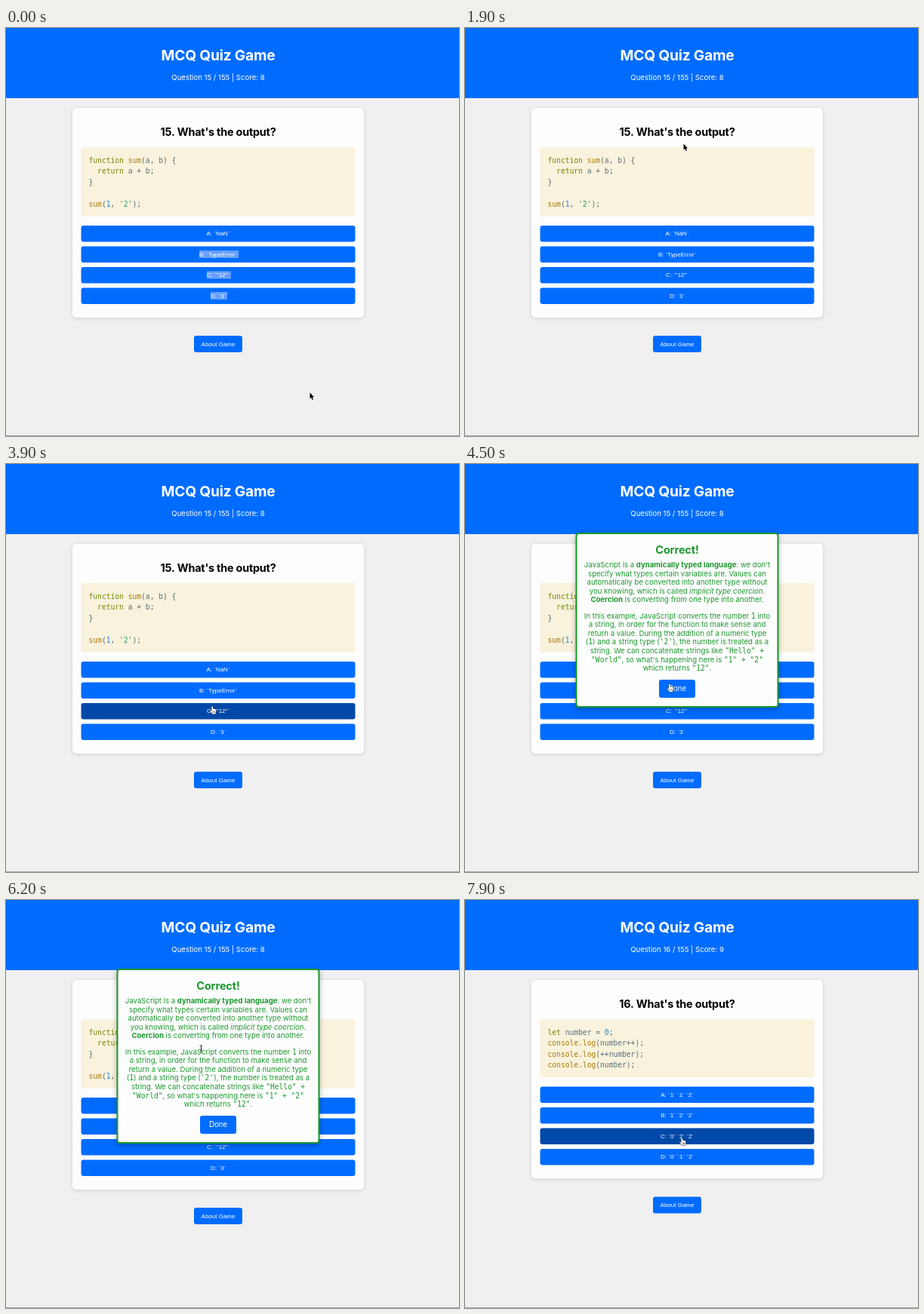
Recreate the animation shown at these times as an HTML page with a canvas. Size 600 by 541 pixels, loop 8 s.

```html
<!DOCTYPE html>
<html lang="en">
<head>
<meta charset="utf-8">
<title>MCQ Quiz Game</title>
<style>
html, body { margin: 0; width: 100%; height: 100%; overflow: hidden; background: #f0f0f0; }
canvas { display: block; width: 600px; height: 541px; }
</style>
</head>
<body>
<canvas id="stage"></canvas>
<script>
const W = 600, H = 541, LOOP = 8000, STEP = 100;
const MID = 281;
const BLUE = '#006cff', DARK = '#0049a8', GREEN = '#1b982d', CARD = '#fdfdfd';
const UI = 'Inter, sans-serif', ARIAL = '"Liberation Sans", Arial, sans-serif';
const MONO = '"DejaVu Sans Mono", monospace';
const DESELECT = 500, POPUP_IN = 4200, POPUP_OUT = 7300;

const canvas = document.getElementById('stage');
const ratio = window.devicePixelRatio || 1;
canvas.width = W * ratio;
canvas.height = H * ratio;
const ctx = canvas.getContext('2d');
ctx.scale(ratio, ratio);

const INK = { k: '#718b08', f: '#ad7b08', n: '#2387d0', s: '#259f6c', p: '#5a6e75' };

// Code lines are lists of "kind:text" tokens.
const first = {
  status: 'Question 15 / 155 | Score: 8',
  title: "15. What's the output?",
  code: [
    ['k:function ', 'f:sum', 'p:(a, b) {'],
    ['k:  return', 'p: a + b;'],
    ['p:}'],
    [],
    ['f:sum', 'p:(', 'n:1', 'p:, ', "s:'2'", 'p:);']
  ],
  answers: ['A: `NaN`', 'B: `TypeError`', 'C: `"12"`', 'D: `3`'],
  shift: 0
};
const second = {
  status: 'Question 16 / 155 | Score: 9',
  title: "16. What's the output?",
  code: [
    ['k:let', 'p: number = ', 'n:0', 'p:;'],
    ['f:console.log', 'p:(number++);'],
    ['f:console.log', 'p:(++number);'],
    ['f:console.log', 'p:(number);']
  ],
  answers: ['A: `1` `1` `2`', 'B: `1` `2` `2`', 'C: `0` `2` `2`', 'D: `0` `1` `2`'],
  shift: -14.5
};

// * bold, _ italic, ` code
const note = [
  "JavaScript is a *dynamically typed language*: we don't",
  'specify what types certain variables are. Values can',
  'automatically be converted into another type without',
  'you knowing, which is called _implicit type coercion_.',
  '*Coercion* is converting from one type into another.',
  '',
  'In this example, JavaScript converts the number `1` into',
  'a string, in order for the function to make sense and',
  'return a value. During the addition of a numeric type',
  "(`1`) and a string type (`'2'`), the number is treated as a",
  'string. We can concatenate strings like `"Hello" +`',
  '`"World"`, so what\'s happening here is `"1" + "2"`',
  'which returns `"12"`.'
];

// time, x, y of the pointer tip
const path = [
  [0, 402, 483], [100, 407, 475], [200, 407, 475], [300, 499, 271], [800, 499, 271],
  [1300, 318, 149], [1900, 289, 153], [2400, 245, 205], [2900, 305, 269], [3000, 308, 267],
  [3100, 306, 254], [3400, 298, 285], [3800, 273, 321], [4300, 273, 321],
  [5100, 258, 133], [5900, 245, 181], [6800, 297, 244], [7100, 285, 297],
  [7300, 285, 297], [7700, 287, 315], [8000, 287, 315]
];

function pointerAt(t) {
  const i = Math.max(1, path.findIndex(k => k[0] >= t));
  const [t0, x0, y0] = path[i - 1], [t1, x1, y1] = path[i];
  const u = Math.min(1, Math.max(0, (t - t0) / (t1 - t0)));
  const e = u * u * (3 - 2 * u);
  return { x: x0 + (x1 - x0) * e, y: y0 + (y1 - y0) * e };
}

const quizAt = t => t < POPUP_OUT ? first : second;
const popupAt = t => t >= POPUP_IN && t < POPUP_OUT;
const answerTop = (quiz, i) => 262 + quiz.shift + i * 27.5;

function answerUnder(t) {
  if (t < 0 || popupAt(t)) return -1;
  const { x, y } = pointerAt(t), quiz = quizAt(t);
  return quiz.answers.findIndex((_, i) => {
    const top = answerTop(quiz, i);
    return x > 99 && x < 462 && y >= top && y < top + 21.5;
  });
}

function box(x, y, w, h, r, fill) {
  ctx.fillStyle = fill;
  ctx.beginPath();
  ctx.roundRect(x, y, w, h, r);
  ctx.fill();
}

function shadow(color, blur, dy, draw) {
  ctx.save();
  ctx.shadowColor = color;
  ctx.shadowBlur = blur * ratio;
  ctx.shadowOffsetY = dy * ratio;
  draw();
  ctx.restore();
}

function setFont(font, spacing = 0) {
  ctx.font = font;
  ctx.letterSpacing = spacing + 'px';
}

function centred(text, y, font, color, spacing) {
  setFont(font, spacing);
  ctx.fillStyle = color;
  ctx.textAlign = 'center';
  ctx.fillText(text, MID, y);
}

function button(text, x, y, w, h, size, fill, selected) {
  box(x, y, w, h, 3, fill);
  setFont(size + 'px ' + ARIAL);
  if (selected) {
    const tw = ctx.measureText(text).width;
    ctx.fillStyle = '#659fff';
    ctx.fillRect(MID - tw / 2, y + 5.5, tw + 2, 10);
  }
  centred(text, y + h / 2 + size * 0.34, size + 'px ' + ARIAL, '#fff');
}

function drawCode(lines) {
  setFont('9.65px ' + MONO);
  ctx.textAlign = 'left';
  lines.forEach((line, row) => {
    let x = 109.5;
    for (const token of line) {
      const text = token.slice(2);
      ctx.fillStyle = INK[token[0]];
      ctx.fillText(text, x, 178.7 + row * 14.5);
      x += ctx.measureText(text).width;
    }
  });
}

function drawPage(t) {
  const quiz = quizAt(t), hot = answerUnder(t - STEP), dy = quiz.shift;
  ctx.fillStyle = '#f0f0f0';
  ctx.fillRect(0, 0, W, H);
  ctx.fillStyle = BLUE;
  ctx.fillRect(0, 0, W, 93);
  ctx.fillStyle = '#a9a9a9';
  ctx.fillRect(0, 540, W, 1);
  centred('MCQ Quiz Game', 42.5, 'bold 19.2px ' + UI, '#fff', -0.2);
  centred(quiz.status, 69.3, '9.6px ' + UI, '#fff', 0);

  shadow('rgba(0,0,0,.15)', 5, 1, () => box(88, 106, 386, 278 + dy, 5, CARD));
  centred(quiz.title, 143.3, 'bold 14.4px ' + UI, '#000', -0.2);
  box(99.5, 158, 363, 92 + dy, 2, '#f9f2dd');
  drawCode(quiz.code);
  quiz.answers.forEach((text, i) => {
    button(text, 99.5, answerTop(quiz, i), 363, 21.5, 8, i === hot ? DARK : BLUE, t < DESELECT && i > 0);
  });
  button('About Game', 249, 408 + dy, 64, 22, 8, BLUE);
}

const noteFonts = {
  '': ['9.6px ' + UI, 0],
  '*': ['bold 9.6px ' + UI, 0],
  '_': ['italic 9.6px ' + UI, 0],
  '`': ['9.6px ' + MONO, 0]
};

function richLine(text, y) {
  let width = 0;
  const runs = (text.match(/\*[^*]+\*|_[^_]+_|`[^`]+`|[^*_`]+/g) || []).map(part => {
    const mark = '*_`'.includes(part[0]) ? part[0] : '';
    const run = { text: mark ? part.slice(1, -1) : part, font: noteFonts[mark] };
    setFont(...run.font);
    run.w = ctx.measureText(run.text).width;
    width += run.w;
    return run;
  });
  let x = MID - width / 2;
  ctx.fillStyle = GREEN;
  ctx.textAlign = 'left';
  for (const run of runs) {
    setFont(...run.font);
    ctx.fillText(run.text, x, y);
    x += run.w;
  }
}

function drawPopup() {
  shadow('rgba(0,0,0,.3)', 7, 2, () => box(146.5, 91, 269, 232, 4, GREEN));
  box(148.5, 93, 265, 228, 2.5, CARD);
  centred('Correct!', 118.7, 'bold 14.4px ' + UI, GREEN, -0.1);
  note.forEach((text, i) => richLine(text, 136.9 + i * 11.6 - (i > 5 ? 2 : 0)));
  button('Done', 257, 286, 48, 24, 10, BLUE);
}

function trace(points, fill, stroke, width) {
  ctx.beginPath();
  for (let i = 0; i < points.length; i += 2) ctx.lineTo(points[i], points[i + 1]);
  ctx.closePath();
  ctx.lineJoin = 'round';
  ctx.lineWidth = width;
  ctx.strokeStyle = stroke;
  ctx.stroke();
  ctx.fillStyle = fill;
  ctx.fill();
}

const shapes = {
  arrow() {
    trace([0.5, 0.5, 0.5, 8.6, 2.3, 7, 3.7, 10.2, 5, 9.6, 3.7, 6.6, 6.1, 6.5], '#000', '#fff', 1.2);
  },
  hand() {
    trace([-0.8, 0.8, 0, 0.2, 0.8, 0.8, 1.1, 3.8, 2.6, 3.6, 3.9, 4.1, 5.2, 4.7, 5.4, 7,
      4.4, 10.5, 0.2, 10.5, -1.2, 8.3, -3, 6.2, -2.3, 5.5, -0.5, 6.7], '#fff', '#111', 1);
    ctx.fillStyle = '#111';
    for (let i = 0; i < 3; i++) ctx.fillRect(0.7 + i * 1.4, 6.5, 0.5, 2.5);
  },
  beam() {
    for (const [color, width] of [['rgba(255,255,255,.7)', 2], ['#222', 1]]) {
      ctx.strokeStyle = color;
      ctx.lineWidth = width;
      ctx.beginPath();
      ctx.moveTo(-1.8, -5); ctx.lineTo(0, -4); ctx.lineTo(1.8, -5);
      ctx.moveTo(0, -4); ctx.lineTo(0, 4);
      ctx.moveTo(-1.8, 5); ctx.lineTo(0, 4); ctx.lineTo(1.8, 5);
      ctx.moveTo(-1.2, 1.5); ctx.lineTo(1.2, 1.5);
      ctx.stroke();
    }
  }
};

function pointerShape(t, x, y) {
  const inside = (l, top, r, b) => x > l && x < r && y > top && y < b;
  if (popupAt(t)) {
    if (inside(257, 286, 305, 310)) return 'hand';
    return inside(160, 105, 402, 277) ? 'beam' : 'arrow';
  }
  if (answerUnder(t) >= 0) return 'hand';
  return inside(200, 129, 360, 147) || inside(109, 168, 452, 240) ? 'beam' : 'arrow';
}

function drawPointer(t) {
  const { x, y } = pointerAt(t);
  ctx.save();
  ctx.translate(x, y);
  shapes[pointerShape(t, x, y)]();
  ctx.restore();
}

function frame(now) {
  const t = Math.floor(now % LOOP / STEP) * STEP;
  drawPage(t);
  if (popupAt(t)) drawPopup();
  drawPointer(t);
  requestAnimationFrame(frame);
}
requestAnimationFrame(frame);
</script>
</body>
</html>
```
